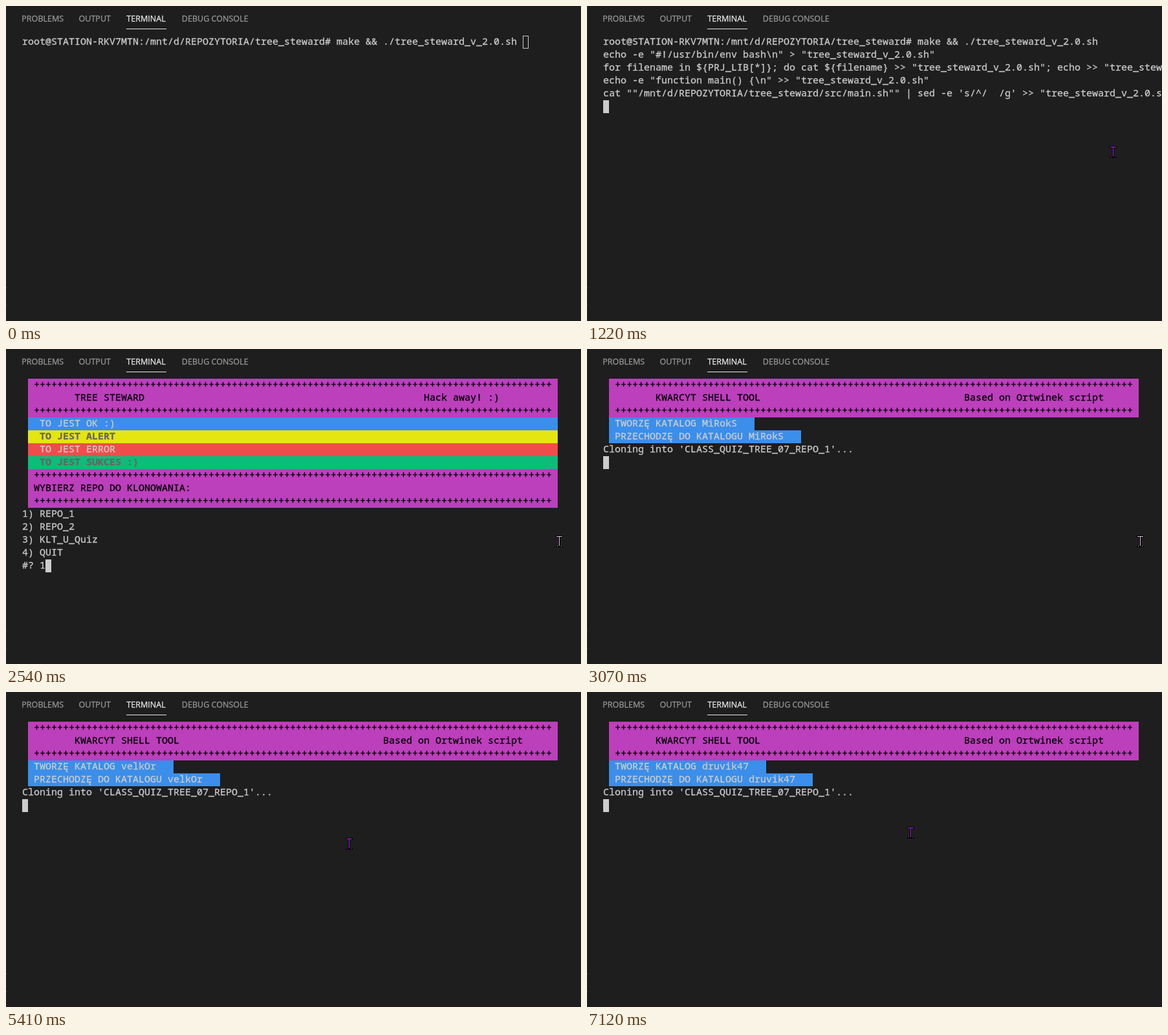
An HTML page that plays this animation: 889 by 488 pixels, repeating every 8 s.

```html
<!DOCTYPE html>
<html lang="pl">
<head>
<meta charset="utf-8">
<title>Terminal</title>
<style>
  html, body { margin: 0; width: 100%; height: 100%; overflow: hidden; background: #1e1e1e; }
  svg { display: block; }
  text { white-space: pre; fill: currentColor; stroke: currentColor; stroke-width: 0.3px; }
  #tabs text { font: 12.55px "Open Sans", "Noto Sans", sans-serif; color: #979797; }
  #tabs .on { color: #e7e7e7; }
  #screen text { font: 15px "Noto Sans Mono", "DejaVu Sans Mono", monospace; }
  rect { shape-rendering: crispEdges; }
</style>
</head>
<body>
<svg width="889" height="488" viewBox="0 0 889 488">
  <rect width="889" height="488" fill="#1e1e1e"/>
  <rect width="1" height="488" fill="#262626"/>
  <rect y="436" width="1" height="1" fill="#666"/>
  <rect y="463" width="1" height="1" fill="#666"/>
  <g id="tabs">
    <text x="24.3" y="24">PROBLEMS</text>
    <text x="112.5" y="24">OUTPUT</text>
    <text class="on" x="186.3" y="24">TERMINAL</text>
    <text x="271.8" y="24">DEBUG CONSOLE</text>
    <rect x="186" y="35" width="62" height="1" fill="#e7e7e7"/>
  </g>
  <g id="screen"></g>
  <g id="mouse"></g>
</svg>
<script>
const LOOP = 8000, LEFT = 25, TOP = 46, CELL = 9, ROW = 20;
const FG = '#cccccc', BLACK = '#000', GREY = '#666';
const PURPLE = '#bc3fbc', BLUE = '#3b8eea', YELLOW = '#e5e510', RED = '#f14c4c', GREEN = '#0dbc79';
const PLUSES = '+'.repeat(89);
const FILE = 'tree_steward_v_2.0.sh';
const DIR = '/mnt/d/REPOZYTORIA/tree_steward';

const screen = document.getElementById('screen');
const mouse = document.getElementById('mouse');

function add(parent, tag, attrs, text) {
  const el = document.createElementNS('http://www.w3.org/2000/svg', tag);
  for (const key in attrs) el.setAttribute(key, attrs[key]);
  if (text) el.textContent = text;
  parent.append(el);
}

const box = (parent, x, y, width, height, fill) => add(parent, 'rect', { x, y, width, height, fill });

function write(row, col, text, color = FG, weight = 400) {
  add(screen, 'text', { x: LEFT + col * CELL, y: TOP + row * ROW + 14, color, style: `font-weight:${weight}` }, text);
}

function band(row, fill, cells = 91, rows = 1) {
  box(screen, LEFT + CELL, TOP + row * ROW, cells * CELL, rows * ROW, fill);
}

function caret(row, col, solid = true) {
  const x = LEFT + col * CELL, y = TOP + row * ROW;
  if (solid) box(screen, x, y, CELL, ROW, FG);
  else add(screen, 'rect', { x: x + 0.5, y: y + 0.5, width: CELL - 1, height: ROW - 1, fill: 'none', stroke: FG });
}

function prompt() {
  write(0, 0, `root@STATION-RKV7MTN:${DIR}# make && ./${FILE}`);
}

function idle(focused) {
  prompt();
  caret(0, 86, focused);
}

function build() {
  prompt();
  [
    `echo -e "#!/usr/bin/env bash\\n" > "${FILE}"`,
    `for filename in \${PRJ_LIB[*]}; do cat \${filename} >> "${FILE}"; echo >> "${FILE}"`,
    `echo -e "function main() {\\n" >> "${FILE}"`,
    `cat ""${DIR}/src/main.sh"" | sed -e 's/^/  /g' >> "${FILE}"`
  ].forEach((line, i) => write(i + 1, 0, line));
  caret(5, 0);
}

function banner(title, note, noteCol) {
  band(0, PURPLE, 91, 3);
  write(0, 2, PLUSES, BLACK);
  write(1, 9, title, BLACK);
  write(1, noteCol, note, BLACK);
  write(2, 2, PLUSES, BLACK);
}

function menu(typed) {
  banner('TREE STEWARD', 'Hack away! :)', 69);
  [
    ['TO JEST OK :)', BLUE, FG, 400],
    ['TO JEST ALERT', YELLOW, GREY, 700],
    ['TO JEST ERROR', RED, FG, 400],
    ['TO JEST SUKCES :)', GREEN, GREY, 700]
  ].forEach(([text, back, color, weight], i) => {
    band(3 + i, back);
    write(3 + i, 3, text, color, weight);
  });
  band(7, PURPLE, 91, 3);
  write(7, 2, PLUSES, BLACK);
  write(8, 2, 'WYBIERZ REPO DO KLONOWANIA:', BLACK);
  write(9, 2, PLUSES, BLACK);
  ['1) REPO_1', '2) REPO_2', '3) KLT_U_Quiz', '4) QUIT', '#? ' + typed]
    .forEach((line, i) => write(10 + i, 0, line));
  caret(14, 3 + typed.length);
}

function clone(name, started = true) {
  banner('KWARCYT SHELL TOOL', 'Based on Ortwinek script', 62);
  ['TWORZĘ KATALOG ', 'PRZECHODZĘ DO KATALOGU '].forEach((lead, i) => {
    const text = lead + name;
    band(3 + i, BLUE, text.length + 4);
    write(3 + i, 2, text);
  });
  if (started) write(5, 0, "Cloning into 'CLASS_QUIZ_TREE_07_REPO_1'...");
  caret(started ? 6 : 5, 0);
}

const scenes = [
  [0, () => idle(false)],
  [440, () => idle(true)],
  [1220, build],
  [1300, () => menu('')],
  [2540, () => menu('1')],
  [3070, () => clone('MiRokS')],
  [4400, () => clone('velkOr', false)],
  [4480, () => clone('velkOr')],
  [5720, () => clone('oltena')],
  [7040, () => clone('druvik47', false)],
  [7120, () => clone('druvik47')]
];

// time, x, y of the pointer centre
const moves = [
  [0, -50, -50],
  [70, 820, 443], [150, 819, 405], [220, 817, 345], [290, 815, 285], [370, 814, 242], [440, 813, 226],
  [2150, 822, 240], [2220, 843, 279], [2290, 855, 298],
  [4170, 850, 298], [4250, 840, 296], [4400, 838, 292],
  [5260, 785, 281], [5340, 660, 254], [5410, 530, 235], [5490, 470, 229],
  [5720, 486, 225], [5800, 498, 220], [6180, 500, 218]
];

function pointer([time, x, y]) {
  const color = time < 2150 || time >= 5260 ? '#b92bf5' : '#dcc4e2';
  box(mouse, x - 5, y - 9, 11, 3, BLACK);
  box(mouse, x - 1, y - 8, 3, 17, BLACK);
  box(mouse, x - 5, y + 7, 11, 2, BLACK);
  box(mouse, x - 4, y - 8, 9, 1, color);
  box(mouse, x, y - 7, 1, 14, color);
  for (const dx of [-3, 3]) box(mouse, x + dx, y + 7, 1, 1, color);
}

const current = (steps, time) => steps.findLast(step => step[0] <= time);
const start = performance.now();
let scene, move;

function frame() {
  const time = (performance.now() - start) % LOOP;
  const nextScene = current(scenes, time), nextMove = current(moves, time);
  if (nextScene !== scene) {
    scene = nextScene;
    screen.replaceChildren();
    scene[1]();
  }
  if (nextMove !== move) {
    move = nextMove;
    mouse.replaceChildren();
    pointer(move);
  }
  requestAnimationFrame(frame);
}
frame();
</script>
</body>
</html>
```
